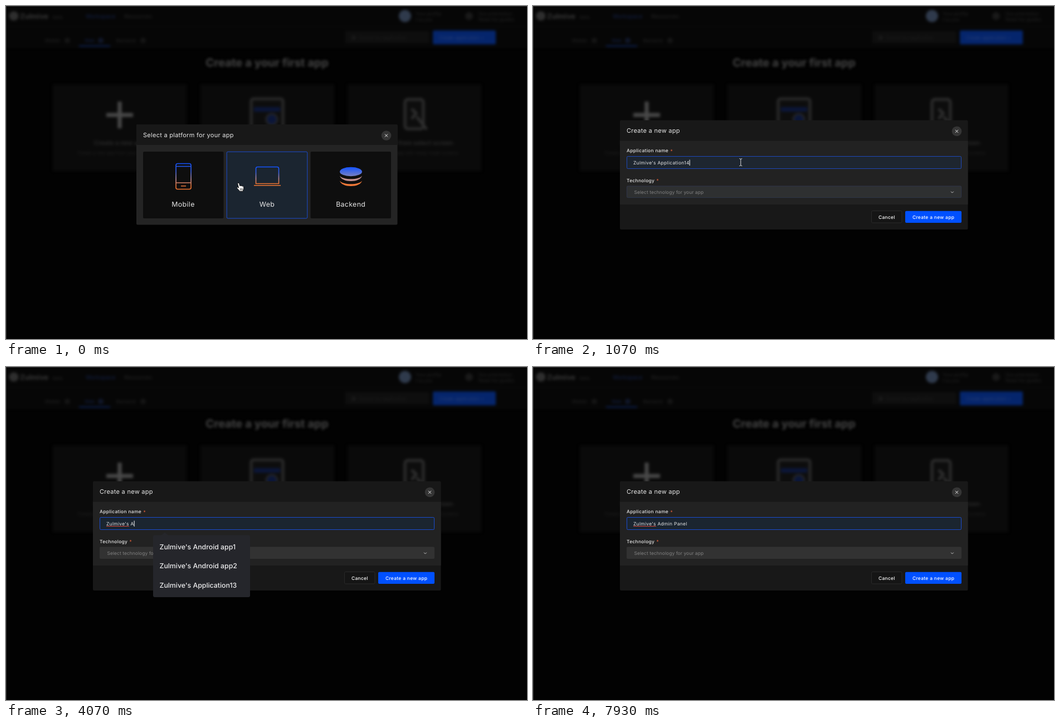
These frames come from a looping animation (935x599 px, 8 s). An HTML page:

```html
<!DOCTYPE html>
<html lang="en">
<head>
<meta charset="utf-8">
<title>Create a new app</title>
<style>
  html, body { margin: 0; width: 100%; height: 100%; overflow: hidden; background: #020202; }
  svg { display: block; width: 100vw; height: 100vh; }
  text { font: 400 8.45px Inter, sans-serif; letter-spacing: .3px; fill: #e6e6e6; text-rendering: geometricPrecision; white-space: pre; }
  .title { font-size: 11px; letter-spacing: .27px; }
  .tile { font-size: 12.35px; letter-spacing: .35px; text-anchor: middle; }
  .medium { font-weight: 500; }
  .button { font-weight: 500; text-anchor: middle; fill: #fff; }
  .hint { fill: #808080; letter-spacing: .06px; }
  .star { fill: #e8623a; }
  .item { font-size: 12.3px; font-weight: 500; letter-spacing: 0; fill: #ededee; }
  #page text { fill: #262626; letter-spacing: 0; }
  #page .heading { font-size: 20.3px; font-weight: 700; fill: #444; text-anchor: middle; }
  #page .card { font-size: 11px; font-weight: 600; text-anchor: middle; fill: #2c2c2c; }
  #page .note { font-size: 8px; text-anchor: middle; fill: #222; }
  #page .blue { fill: #14224a; }
  .line { fill: none; stroke: url(#fade); stroke-width: 1.6; }
  .focus { fill: #1b2530; stroke: #1a4cd0; }
</style>
</head>
<body>
<svg viewBox="0 0 935 599" preserveAspectRatio="none">
  <defs>
    <filter id="soft" filterUnits="userSpaceOnUse" x="0" y="0" width="935" height="599" color-interpolation-filters="sRGB"><feGaussianBlur stdDeviation="2.4"/></filter>
    <linearGradient id="fade" x1="0" y1="0" x2="0" y2="1">
      <stop offset="0" stop-color="#1453ff"/><stop offset=".3" stop-color="#3b62e0"/>
      <stop offset=".62" stop-color="#b98a94"/><stop offset=".9" stop-color="#ee7430"/>
    </linearGradient>
    <linearGradient id="disc" x1="0" y1="0" x2="0" y2="1">
      <stop offset="0" stop-color="#1453ff"/><stop offset="1" stop-color="#7880c0"/>
    </linearGradient>
  </defs>

  <rect width="935" height="599" fill="#020202"/>
  <g id="page" filter="url(#soft)">
    <rect x="-9" y="-9" width="953" height="83" fill="#060606"/>
    <rect y="37" width="935" height="1" fill="#0c0c0c"/>
    <rect y="73" width="935" height="1.5" fill="#0d0d0d"/>
    <circle cx="14" cy="18" r="8.5" fill="#2e2e2e"/>
    <text x="25" y="23" style="font-size:13px;font-weight:700;fill:#383838">Zulmive</text>
    <text x="84" y="23">beta</text>
    <text class="blue" x="143" y="22" style="font-size:10px">Workspace</text>
    <text x="212" y="22" style="font-size:10px">Resources</text>
    <circle cx="716" cy="18" r="11" fill="#2f3a4c"/>
    <text x="735" y="17">Your profile</text>
    <text x="735" y="27" style="font-size:7px">Free plan</text>
    <circle cx="831" cy="18" r="7" fill="#191919"/>
    <text x="848" y="17">Documentation</text>
    <text x="848" y="27">Read the guides</text>
    <text x="70" y="65">Mobile</text><circle cx="110" cy="62" r="5" fill="#151515"/>
    <text class="blue" x="141" y="65">Web</text><circle cx="170" cy="62" r="5" fill="#10172a"/>
    <rect x="131" y="71" width="56" height="2" fill="#0a2260"/>
    <text x="198" y="65">Backend</text><circle cx="246" cy="62" r="5" fill="#151515"/>
    <rect x="609" y="45" width="151" height="22" fill="#0e0e0e"/>
    <circle cx="624" cy="57" r="4" fill="#191919"/>
    <text x="633" y="60" style="fill:#1e1e1e">Search by application</text>
    <rect x="766" y="44" width="113" height="25" rx="2" fill="#05256c"/>
    <text x="777" y="60" style="fill:#2a4078">Create application +</text>
    <text class="heading" x="468.5" y="109">Create a your first app</text>
    <g fill="#0a0a0a"><rect x="84" y="141" width="240" height="156"/><rect x="349" y="141" width="240" height="156"/><rect x="613" y="141" width="240" height="156"/></g>
    <path d="M204 172v48M180 196h48" stroke="#484848" stroke-width="7"/>
    <rect x="440" y="167" width="57" height="54" rx="4" fill="#0d0d0d" stroke="#292929" stroke-width="5"/>
    <path d="M445 186h47" stroke="#0b1639" stroke-width="8"/>
    <circle cx="477" cy="204" r="10" fill="#0b1639" stroke="#262626" stroke-width="3"/>
    <rect x="716" y="168" width="33" height="53" rx="5" fill="#0d0d0d" stroke="#2c2c2c" stroke-width="5"/>
    <path d="M728 185l8 8-8 10M737 199l18 23" fill="none" stroke="#2f2f2f" stroke-width="5"/>
    <text class="card" x="204" y="250">Create a new app</text><text class="note" x="204" y="267">Create a new app from your own design</text>
    <text class="card" x="733" y="250">Design from select screen</text><text class="note" x="733" y="267">Build a new app with ready made screens</text>
  </g>
  <path d="M0 .5H935M.5 0V599" stroke="#303030"/>

  <g id="platforms">
    <rect x="234" y="213" width="468.5" height="180.5" rx="2" fill="#242424"/>
    <rect x="234" y="213" width="468.5" height="37" rx="2" fill="#181818"/>
    <text class="title" x="246" y="235.5">Select a platform for your app</text>
    <circle cx="682.5" cy="233" r="8.8" fill="#353535"/>
    <path d="M680 230.5l5 5m0-5l-5 5" stroke="#eee"/>
    <rect x="246" y="262" width="144.5" height="120" rx="2" fill="#0e0e0e"/>
    <rect class="focus" x="396.2" y="262.2" width="144.6" height="119.8" rx="2"/>
    <rect x="546.5" y="262" width="144.5" height="120" rx="2" fill="#0e0e0e"/>
    <path class="line" d="M308 283.500H329q3 0 3 3V326.500q0 3-3 3H308q-3 0-3-3V286.500q0-3 3-3ZM305 288.500h27M305 318h27M314 323.700h9"/>
    <path class="line" d="M448.500 319.500V292.500q0-3 3-3H486.500q3 0 3 3V319.500ZM445 322.800h48"/>
    <ellipse cx="619" cy="298" rx="20" ry="8.2" fill="url(#disc)"/>
    <path d="M599 305.300C602 318.300 636 318.300 639 305.300C634 313.300 604 313.300 599 305.300Z" fill="#c4918f"/>
    <path d="M599 314.300C602 327.300 636 327.300 639 314.300C634 322.300 604 322.300 599 314.300Z" fill="#ee7838"/>
    <text class="tile" x="318" y="361">Mobile</text>
    <text class="tile" x="468.5" y="361">Web</text>
    <text class="tile" x="618.7" y="361">Backend</text>
  </g>

  <g id="form">
    <rect x="156" y="205.5" width="624.5" height="196.5" rx="2" fill="#181818"/>
    <rect x="156" y="242.5" width="624.5" height="114.5" fill="#222"/>
    <text class="title" x="168" y="228">Create a new app</text>
    <circle cx="760.5" cy="225.3" r="8.8" fill="#353535"/>
    <path d="M758 222.800l5 5m0-5l-5 5" stroke="#eee"/>
    <text class="medium" x="168" y="263">Application name</text><text class="star" x="246.5" y="263.5">*</text>
    <text class="medium" x="168" y="316.5">Technology</text><text class="star" x="221.5" y="317">*</text>
    <rect x="168" y="270" width="601" height="23" rx="2" fill="#323232"/>
    <rect id="nameFocus" class="focus" x="168.5" y="270.5" width="600" height="22" rx="2"/>
    <rect x="168" y="323.5" width="601" height="21.5" rx="2" fill="#323232"/>
    <rect id="techFocus" class="focus" x="168.5" y="324" width="600" height="20.7" rx="2"/>
    <text class="hint" x="181.5" y="337.8">Select technology for your app</text>
    <path d="M750 333.700l2.400 2.400 2.400-2.400" fill="none" stroke="#c8c8c8"/>
    <rect id="techCaret" x="180.2" y="329" width="1" height="11" fill="#fff"/>
    <path id="spelling" d="M180 286.5" stroke="#d2483e" stroke-width="1.2"/>
    <text id="name" x="180" y="285"></text>
    <rect id="nameCaret" y="276.5" width="1" height="10.5" fill="#fff"/>
    <rect x="607.5" y="368.5" width="54.5" height="21.5" rx="2" fill="#151515" stroke="#2a2a2a"/>
    <text class="button" x="634.9" y="382.6">Cancel</text>
    <rect x="668" y="368.7" width="101" height="21.3" rx="2" fill="#0050ff"/>
    <text class="button" x="718.6" y="382.6">Create a new app</text>
    <g id="popup">
      <path d="M278 303.500l7-6 7 6z" fill="#25262b"/>
      <rect id="popupBox" x="264" y="302.5" width="174" rx="3" fill="#25262b"/>
      <text class="item" x="275.5" y="327.6"></text>
      <text class="item" x="275.5" y="362.4"></text>
      <text class="item" x="275.5" y="397.2"></text>
    </g>
  </g>

  <g id="mouse">
    <g id="hand" stroke-linejoin="round" stroke-linecap="round">
      <path d="M-1.3 .8C-1.3-.9 1.3-.9 1.6 .8L2.6 5C3.4 4 5 4.2 5.2 5.2 6 4.4 7.4 4.8 7.6 5.8 8.4 5.2 9.4 5.6 9.5 6.8 9.8 9.5 9.6 11 8.6 12.5V14.5H2.2C1.5 12.5-2.2 9.8-2.6 8.2-2.6 7-.8 6.9 .4 8.2Z" fill="#fff" stroke="#000" stroke-width=".9"/>
      <path d="M3.400 9.500v3M5.300 9.500v3M7.200 9.500v3" stroke="#000" stroke-width=".7"/>
    </g>
    <path id="arrow" d="M.5 .5V15L4 11.700 6.400 17 8.900 15.900 6.500 10.800H11Z" fill="#000" stroke="#fff" stroke-width="1.2" stroke-linejoin="round"/>
    <path id="beam" d="M-2.500-6.500Q0-6.500 0-5V5Q0 6.500-2.500 6.500M2.500-6.500Q0-6.500 0-5M0 5Q0 6.500 2.500 6.500" fill="none" stroke="#ddd"/>
  </g>
</svg>
<script>
  const $ = id => document.getElementById(id);
  const show = (node, on) => node.setAttribute('visibility', on ? 'inherit' : 'hidden');
  const ramp = (t, from, to) => Math.min(1, Math.max(0, (t - from) / (to - from)));

  const LOOP = 8000, OWNER = "Zulmive's ";
  const saved = ['Android app1', 'Android app2', 'Application13'];

  // [start time, typed text, caret visible, number of suggestions]
  const steps = [
    [0, 'Application14', 0, 0], [1000, 'Application14', 1, 0], [1530, 'Application14', 0, 0],
    [1800, 'Application1', 1, 0], [1930, 'Application', 1, 1], [2070, 'Applicatio', 1, 1],
    [2200, 'Applicati', 1, 1], [2330, 'Applicat', 1, 1],
    [2470, 'Applica', 1, 1], [2530, 'Applic', 1, 1], [2660, 'Appli', 1, 1], [2730, 'Appl', 1, 1],
    [2870, 'App', 1, 1], [3070, 'Ap', 1, 1],
    [3330, 'A', 1, 3], [3530, 'A', 0, 3], [4070, 'A', 1, 3],
    [4400, 'Ad', 1, 2], [4470, 'Adm', 1, 0], [4670, 'Admi', 1, 0], [4930, 'Admin', 1, 0],
    [5470, 'Admin ', 1, 0], [5930, 'Admin ', 0, 0], [6130, 'Admin P', 1, 0],
    [6400, 'Admin Pa', 1, 0], [6930, 'Admin Pa', 0, 0], [7070, 'Admin Pan', 1, 0],
    [7270, 'Admin Pane', 1, 0], [7470, 'Admin Panel', 1, 0], [7930, 'Admin Panel', 0, 0]
  ];

  const items = [...document.querySelectorAll('.item')];

  function drawField(t) {
    const [, typed, caret, count] = steps.findLast(s => s[0] <= t);
    const name = $('name');
    name.textContent = OWNER + typed;
    $('nameCaret').setAttribute('x', 180 + name.getSubStringLength(0, OWNER.length + typed.length));
    show($('nameCaret'), caret);
    $('spelling').setAttribute('d', `M180 286.5h${name.getSubStringLength(0, OWNER.length - 1)}`);
    show($('spelling'), t >= 1800);

    show($('popup'), count);
    $('popupBox').setAttribute('height', 7 + 34.8 * count);
    const offered = count === 1 ? saved.slice(2) : saved.slice(0, count);
    items.forEach((item, i) => item.textContent = offered[i] ? OWNER + offered[i] : '');
  }

  function drawMouse(t) {
    const p = ramp(t, 270, 730);
    const shape = t < 270 ? 'hand' : t < 670 ? 'arrow' : 'beam';
    for (const id of ['hand', 'arrow', 'beam']) show($(id), id === shape);
    show($('mouse'), t < 1800);
    const [x, y] = shape === 'hand' ? [417, 318.7] : [416 - 43.2 * p, 320 - 40.4 * p];
    $('mouse').setAttribute('transform', `translate(${x} ${shape === 'beam' ? y + 1.5 : y})`);
  }

  const start = performance.now();
  function frame() {
    const t = (performance.now() - start) % LOOP;
    show($('platforms'), t < 70);
    show($('form'), t >= 70);
    const moved = ramp(t, 900, 1100);
    $('nameFocus').setAttribute('opacity', moved);
    $('techFocus').setAttribute('opacity', t < 130 ? 0 : 1 - moved);
    show($('techCaret'), t >= 70 && t < 570);
    drawField(t);
    drawMouse(t);
    requestAnimationFrame(frame);
  }
  frame();
</script>
</body>
</html>
```
